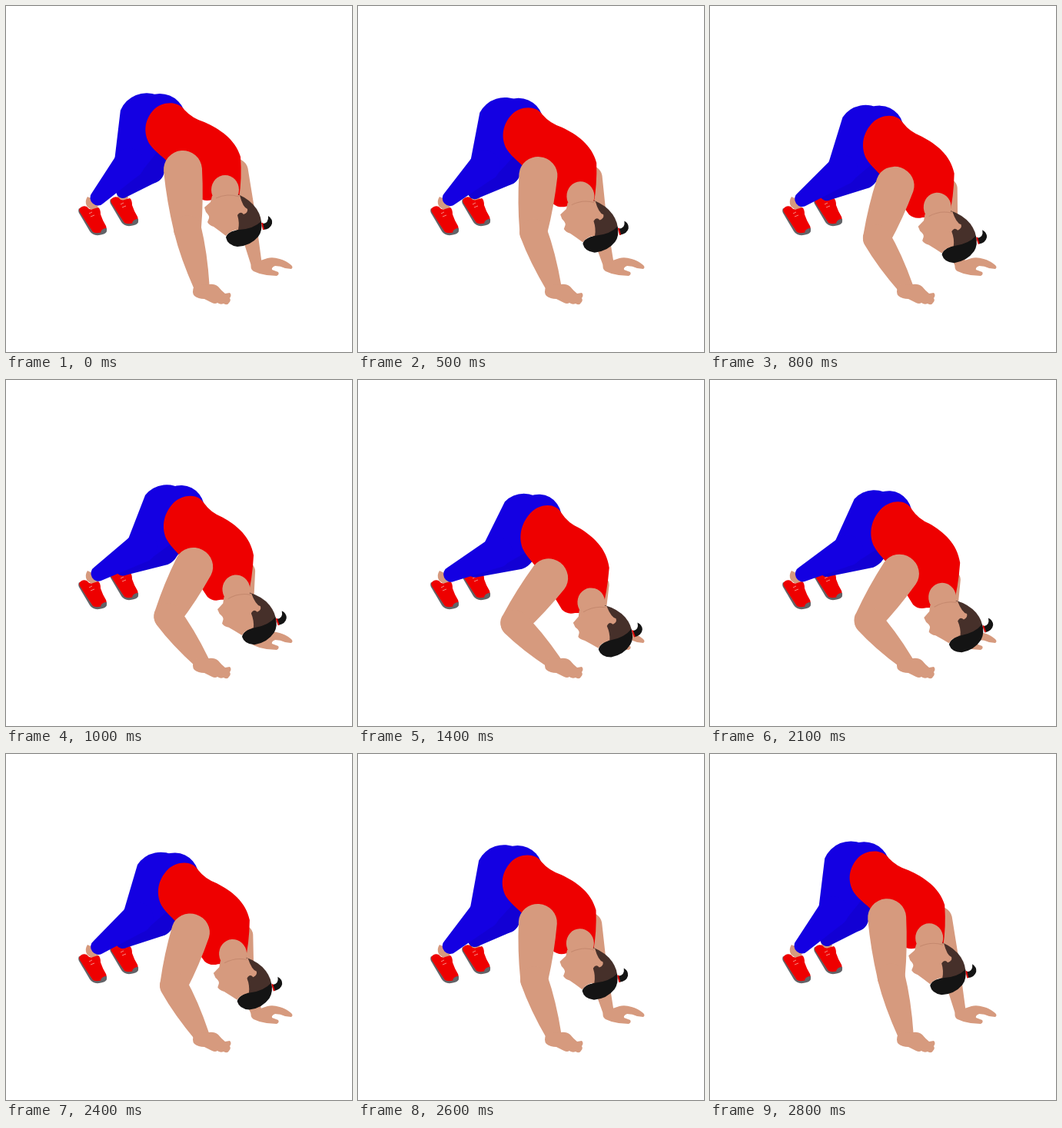
An HTML page without scripts for the animation above (2.9 s loop, 450 by 450 pixels).

```html
<!DOCTYPE html>
<html lang="en">
<head>
<meta charset="utf-8">
<title>Pike push-up</title>
<style>
@property --tick { syntax: "<number>"; inherits: true; initial-value: 0; }
@keyframes run { to { --tick: 29; } }

html, body { margin: 0; width: 100%; height: 100%; overflow: hidden; background: #fff; }

svg {
  display: block; width: 100%; height: 100%;
  animation: run 2900ms steps(29) infinite;

  /* p: depth of the push-up, 0 up to 1 down; q: forward travel, slightly ahead of p */
  --lower: clamp(0, (var(--tick) - 1) / 15.6, 1);
  --raise: clamp(0, (var(--tick) - 18) / 10.5, 1);
  --p: calc((cos(180deg * var(--raise)) - cos(180deg * var(--lower))) / 2);
  --q: calc(var(--p) * (1.6 - .6 * var(--p)));

  /* joints */
  --hip-x: calc(183 + 36 * var(--q));          --hip-y: calc(150 + 36 * var(--p));
  --knee-x: calc(160 + 20 * var(--q));         --knee-y: calc(205 + 21 * var(--p));
  --ankle-x: calc(119 + 2 * var(--p));         --ankle-y: calc(250 + 3 * var(--p));
  --far-hip-x: calc(203 + 32 * var(--q));      --far-hip-y: calc(165 + 36 * var(--p));
  --far-knee-x: calc(188 + 20 * var(--q));     --far-knee-y: calc(213 + 17 * var(--p));
  --far-ankle-x: calc(152 + 2 * var(--p));     --far-ankle-y: calc(241 + 7 * var(--p));
  --shoulder-x: calc(230 + 19 * var(--q));     --shoulder-y: calc(213 + 47 * var(--p));
  --elbow-x: calc(236 - 34 * var(--q));        --elbow-y: calc(290 + 28 * var(--p));
  --far-shoulder-x: calc(298 + 12 * var(--q)); --far-shoulder-y: calc(215 + 55 * var(--p));
  --far-elbow-x: calc(311 - 3 * var(--q));     --far-elbow-y: calc(270 + 45 * var(--p));
}

/* A limb segment drawn along x, laid from joint a to joint b */
.bone {
  --dx: calc(var(--bx) - var(--ax));
  --dy: calc(var(--by) - var(--ay));
  transform:
    translate(calc(var(--ax) * 1px), calc(var(--ay) * 1px))
    rotate(atan2(var(--dy), var(--dx)))
    scaleX(calc(hypot(var(--dx), var(--dy)) / var(--len)));
}
.thigh { --ax: var(--hip-x); --ay: var(--hip-y); --bx: var(--knee-x); --by: var(--knee-y); --len: 60; }
.shin { --ax: var(--knee-x); --ay: var(--knee-y); --bx: var(--ankle-x); --by: var(--ankle-y); --len: 60; }
.far-thigh { --ax: var(--far-hip-x); --ay: var(--far-hip-y); --bx: var(--far-knee-x); --by: var(--far-knee-y); --len: 50; }
.far-shin { --ax: var(--far-knee-x); --ay: var(--far-knee-y); --bx: var(--far-ankle-x); --by: var(--far-ankle-y); --len: 46; }
.upper-arm { --ax: var(--shoulder-x); --ay: var(--shoulder-y); --bx: var(--elbow-x); --by: var(--elbow-y); --len: 77; }
.forearm { --ax: var(--elbow-x); --ay: var(--elbow-y); --bx: 255; --by: 367; --len: 79; }
.far-upper-arm { --ax: var(--far-shoulder-x); --ay: var(--far-shoulder-y); --bx: var(--far-elbow-x); --by: var(--far-elbow-y); --len: 57; }
.far-forearm { --ax: var(--far-elbow-x); --ay: var(--far-elbow-y); --bx: 326; --by: 337; --len: 69; }

.trunk {
  transform: matrix(
    calc(1 - .028 * var(--q)), calc(.0625 * var(--p)),
    calc(-.156 * var(--q)), calc(1 + .095 * var(--p)),
    calc(61.5 * var(--q)), calc(13.9 * var(--p)));
}
.head {
  transform-origin: 285px 239px;
  transform: translate(calc(19px * var(--q)), calc(54px * var(--p))) rotate(calc(-8deg * var(--q)));
}

.skin { fill: #d69a7e; }
.red { fill: #ee0000; }
.blue { fill: #1400e2; }
.far-blue { fill: #1200d4; }
.brown { fill: #46302a; }
.black { fill: #141414; }
.sole { fill: #626468; }
.lace { fill: none; stroke: #f7b0a8; stroke-width: .8; }
.crease { fill: none; stroke: #c4886e; stroke-width: 1; }
</style>
</head>
<body>
<svg viewBox="0 0 450 450">
  <defs>
    <g id="shoe">
      <path class="sole" d="M95 263Q93 267 96 271L109 293Q113 299 121 298Q130 297 131 293L130 287Z"/>
      <path class="red" d="M97 262Q101 259 105 261Q109 266 113 264L120 262Q123 264 123 271Q126 280 130 286Q132 291 127 293Q119 297 113 294Q109 288 105 282L96 268Q94 264 97 262Z"/>
      <path class="sole" d="M123 294Q125 289 131 289Q132 294 127 296Z"/>
      <path class="lace" d="M108 270l4 -2M110 274l5 -2"/>
    </g>
  </defs>

  <!-- far arm -->
  <g class="skin">
    <path class="bone far-upper-arm" d="M0 -17A17 17 0 0 0 0 17L57 13A13 13 0 0 0 57 -13Z"/>
    <path class="bone far-forearm" d="M0 -13A13 13 0 0 0 0 13L69 7A7 7 0 0 0 69 -7Z"/>
    <path d="M319 335Q317 342 322 345Q330 349 339 350L352 351Q356 349 354 346L346 343Q345 340 350 338Q357 338 363 341L371 342Q374 340 371 337Q364 331 356 329Q347 326 340 328L331 331Z"/>
  </g>

  <!-- feet -->
  <path class="skin" d="M144 243L159 248L157 255Q150 260 146 253ZM106 248L120 255L119 264Q111 267 105 260Q102 254 106 248Z"/>
  <use href="#shoe" transform="translate(41 -12)"/>
  <use href="#shoe"/>

  <!-- legs -->
  <g class="far-blue">
    <path class="bone far-thigh" d="M0 -24A24 24 0 0 0 0 24L50 18A18 18 0 0 0 50 -18Z"/>
    <path class="bone far-shin" d="M0 -18A18 18 0 0 0 0 18L46 9A9 9 0 0 0 46 -9Z"/>
  </g>
  <g class="blue">
    <circle class="trunk" cx="200" cy="148" r="34"/>
    <path class="bone thigh" d="M0 -37A37 37 0 0 0 0 37L60 20A20 20 0 0 0 60 -20Z"/>
    <path class="bone shin" d="M0 -20A20 20 0 0 0 0 20L60 10A9 10 0 0 0 60 -10Z"/>
  </g>

  <path class="red trunk" d="M232 135C222 122 202 125 192 135C180 148 178 165 187 180C196 192 205 196 212 205L250 249Q258 255 268 252L303 250Q307 225 305 196C298 173 278 160 258 151Q242 146 232 135Z"/>

  <g class="head">
    <path class="brown" d="M302 245Q318 252 326 264Q333 275 332 286L318 293L300 292L298 265Z"/>
    <path class="black" d="M286 301Q288 293 303 291Q322 290 332 280Q334 292 328 300Q318 312 301 313Q288 311 286 301Z"/>
    <path class="black" d="M333 283Q342 283 341 273Q347 277 346 283Q344 290 335 291Z"/>
    <path d="M333 282L335 291" stroke="#d80000" stroke-width="2"/>
    <g class="skin">
      <ellipse cx="285" cy="239" rx="18" ry="19"/>
      <path d="M268 247L266 255L258 262L260 268Q265 273 264 276L262 281Q264 285 270 287Q277 292 286 299Q293 291 302 291Q304 282 301 272Q305 266 309 271Q315 269 314 264Q308 262 304 246Z"/>
    </g>
    <path class="crease" d="M273 250Q288 243 303 248"/>
  </g>

  <!-- near arm -->
  <g class="skin">
    <path class="bone upper-arm" d="M0 -25A25 25 0 0 0 0 25Q40 24 77 18A18 18 0 0 0 77 -18Q40 -24 0 -25Z"/>
    <path class="bone forearm" d="M0 -18A18 18 0 0 0 0 18Q35 18 79 10A10 10 0 0 0 79 -10Q35 -18 0 -18Z"/>
    <path d="M245 363Q241 373 245 377Q250 381 258 381L268 386Q272 388 275 386Q279 389 283 387Q288 390 290 386Q293 383 291 380Q294 376 291 373L285 374Q280 370 276 365Q271 361 264 362Z"/>
  </g>
</svg>
</body>
</html>
```
